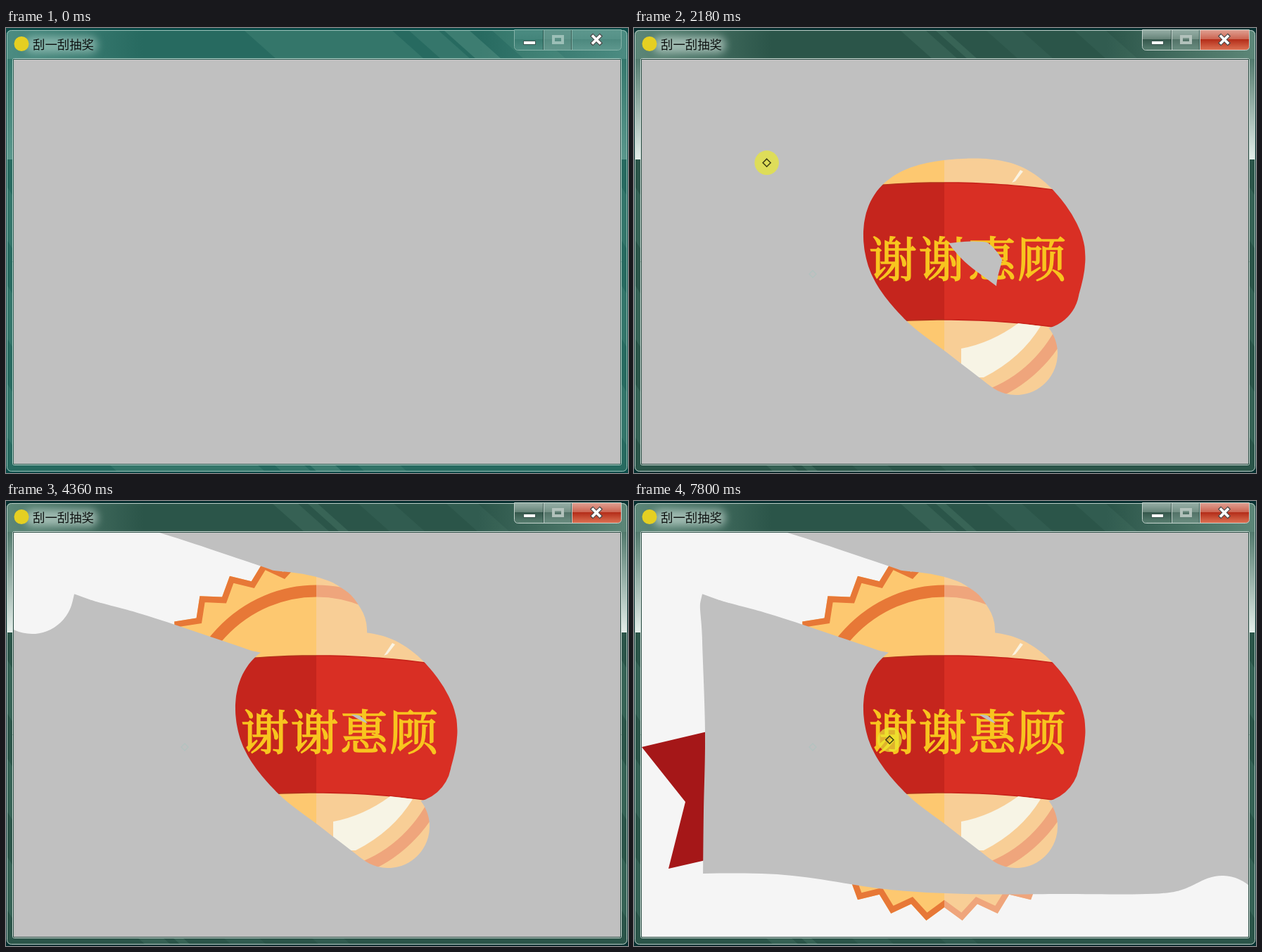
Animation, 884 px wide and 633 px high, one loop 8000 ms. Source, as an HTML page with a canvas:

```html
<!DOCTYPE html>
<html lang="zh">
<head>
<meta charset="utf-8">
<title>刮一刮抽奖</title>
<style>
html, body { margin: 0; width: 100%; height: 100%; overflow: hidden; background: #0a4a48; }
canvas { display: block; }
</style>
</head>
<body>
<canvas id="stage" width="884" height="633"></canvas>
<script>
const W = 884, H = 633, LOOP = 8000, STEP = 312, LEAD = 20, LAST = 25;
const BRUSH = 59, DOWN = 3;
const FONT = '"Noto Sans CJK SC", "Noto Sans CJK", sans-serif';
const SERIF = '"Noto Serif CJK SC", "Noto Sans CJK SC", "Noto Sans CJK", serif';
const ctx = document.getElementById('stage').getContext('2d');

// Brush path: splines through key points spread evenly from one step to another.
const path = [
  { from: 1, to: 3, keys: [[672, 607], [543, 463]] },
  { from: 3, to: 7, keys: [[543, 463], [482, 416], [425, 371], [389, 320], [392, 268], [445, 247], [528, 252], [580, 312], [574, 370]] },
  { from: 7, to: 10, keys: [[574, 370], [540, 372], [500, 374], [450, 348], [412, 312], [454, 184], [365, 156]] },
  { from: 10, to: 19, keys: [[365, 156], [225, 109], [150, 88], [68, 68], [37, 130], [38, 200], [42, 330], [40, 440], [39, 540], [39, 590]] },
  { from: 19, to: 25, keys: [[39, 590], [200, 590], [352, 611], [470, 618], [600, 618], [765, 616], [836, 592]] }
];

function spline(a, b, c, d, t) {
  const m = (c - a) / 2, n = (d - b) / 2;
  return b + t * (m + t * (3 * (c - b) - 2 * m - n + t * (2 * (b - c) + m + n)));
}

function brushAt(step) {
  const { from, to, keys } = path.find(s => step <= s.to);
  const end = keys.length - 1;
  const u = (step - from) / (to - from) * end;
  const i = Math.min(end - 1, Math.floor(u));
  const key = k => keys[Math.max(0, Math.min(end, k))];
  return [0, 1].map(n => spline(key(i - 1)[n], key(i)[n], key(i + 1)[n], key(i + 2)[n], u - i));
}

function layer() {
  const c = document.createElement('canvas');
  c.width = W;
  c.height = H;
  return c.getContext('2d');
}

function poly(g, pts, fill) {
  g.beginPath();
  for (let i = 0; i < pts.length; i += 2) g.lineTo(pts[i], pts[i + 1]);
  g.closePath();
  if (fill) {
    g.fillStyle = fill;
    g.fill();
  }
}

function rect(g, x, y, w, h, fill) {
  g.fillStyle = fill;
  g.fillRect(x, y, w, h);
}

function disc(g, x, y, r, fill) {
  g.fillStyle = fill;
  g.beginPath();
  g.arc(x, y, r, 0, 2 * Math.PI);
  g.fill();
}

function fade(g, x0, y0, x1, y1, ...stops) {
  const s = g.createLinearGradient(x0, y0, x1, y1);
  for (const [at, color] of stops) s.addColorStop(at, color);
  return s;
}

function outline(g, x, y, w, h, r, color, width = 1) {
  g.strokeStyle = color;
  g.lineWidth = width;
  g.beginPath();
  g.roundRect(x, y, w, h, r);
  g.stroke();
}

// One half of the medal with its ribbon
function medalHalf(g, x, body, edge, band, rim) {
  g.save();
  g.beginPath();
  g.rect(x, 0, 441, H);
  g.clip();

  g.save();
  const star = [];
  for (let k = 0; k < 64; k++) {
    const a = k * Math.PI / 32, r = k % 2 ? 261 : 241;
    star.push(441 + r * Math.sin(a), 337 - r * Math.cos(a));
  }
  poly(g, star, body);
  g.clip();
  g.strokeStyle = edge;
  g.lineWidth = 17;
  g.stroke();
  g.beginPath();
  g.ellipse(441, 331, 191, 203, 0, 0, 2 * Math.PI);
  g.stroke();
  g.restore();

  const sag = dx => dx * dx * .00042;
  const curve = y => {
    for (let dx = -220; dx <= 220; dx += 10) g.lineTo(441 + dx, y + sag(dx));
  };
  g.beginPath();
  curve(220);
  g.lineTo(661, 415 + sag(220));
  for (let dx = 220; dx >= -220; dx -= 10) g.lineTo(441 + dx, 415 + sag(dx));
  g.fillStyle = band;
  g.fill();
  g.strokeStyle = rim;
  g.lineWidth = 1.6;
  g.stroke();
  g.restore();
}

function drawCard() {
  const g = layer();
  rect(g, 0, 0, W, H, '#f5f5f5');
  poly(g, [11, 350, 180, 310, 180, 493, 49, 523, 73, 428], '#a51718');
  medalHalf(g, 0, '#fdc870', '#e77837', '#c5251d', '#b3301a');
  medalHalf(g, 441, '#f8ce96', '#efa57c', '#d92f24', '#c7231a');

  g.fillStyle = '#f7f4e5';
  g.beginPath();
  g.moveTo(465, 456);
  g.quadraticCurveTo(508, 448, 546, 420);
  g.lineTo(578, 424);
  g.quadraticCurveTo(550, 470, 497, 497);
  g.lineTo(465, 497);
  g.fill();
  poly(g, [537, 220, 549, 202, 553, 204, 542, 218], '#faf3e2');

  g.font = '500 68px ' + SERIF;
  g.textAlign = 'center';
  g.fillStyle = g.strokeStyle = '#f8c51f';
  g.lineWidth = 1.5;
  [...'谢谢惠顾'].forEach((ch, i) => {
    g.fillText(ch, 368 + i * 70.5, 354);
    g.strokeText(ch, 368 + i * 70.5, 354);
  });
  return g.canvas;
}

function streak(g, x, w, alpha) {
  const color = `rgba(150,200,180,${alpha})`;
  poly(g, [x, 3, x + w, 3, x + w + 46, 44, x + 46, 44], color);
  poly(g, [x - 190, 622, x + w - 190, 622, x + w - 180, 631, x - 180, 631], color);
}

const idleLook = {
  back: '#0a4a48', glass: '#276a60', glint: '#4c8c82', side: ['#35786d', '#5a978c'],
  rim: '#9ac4ba', frame: '#b6d5cd', inner: '#28594f', line: '#85b3a9', glow: 'rgba(195,225,215,.5)',
  button: ['#4b8b81', '#44857b', '#3a7c71', '#4c8b80'],
  close: ['#5d978d', '#559187', '#4c887e', '#5d978d'], box: '#9cbfb7'
};
const focusLook = {
  back: '#062f30', glass: '#2b5549', glint: '#5d8778', side: ['#527a6d', '#e4eeea'],
  rim: '#bdd0c9', frame: '#d5e2dd', inner: '#24473e', line: '#c3d2cc', glow: 'rgba(215,232,225,.6)',
  button: ['#96aea6', '#678479', '#35574c', '#587e70'],
  close: ['#e0a092', '#cc6552', '#b32c18', '#dc7052'], box: '#b2c1bb'
};

function drawFrame(look, streaks) {
  const g = layer();
  rect(g, 0, 0, W, H, look.back);
  g.save();
  g.beginPath();
  g.roundRect(1, 3, 882, 628, 6);
  g.clip();
  rect(g, 0, 0, W, H, look.glass);
  rect(g, 0, 3, W, 41, fade(g, 0, 0, W, 0,
    [0, look.glint], [.22, look.glass], [.76, look.glass], [1, look.glint]));
  for (const s of streaks) streak(g, ...s);

  // Bright upper part of both side borders
  for (const x of [1, 874]) {
    rect(g, x, 44, 9, 143, fade(g, 0, 44, 0, 187, [0, look.side[0]], [1, look.side[1]]));
    for (let y = 225; y < 560; y += 140)
      poly(g, [x, y, x + 9, y + 14, x + 9, y + 90, x, y + 76], 'rgba(130,190,170,.13)');
  }

  g.filter = 'blur(6px)';
  g.fillStyle = look.glow;
  g.beginPath();
  g.roundRect(28, 12, 102, 24, 10);
  g.fill();
  g.restore();

  outline(g, 1.5, 3.5, 881, 627, 6, look.rim);
  outline(g, 9.5, 43.5, 865, 578, 2, look.frame);
  outline(g, 10.5, 44.5, 863, 576, 0, look.inner);
  rect(g, 11, 45, 862, 575, '#c0c0c0');

  disc(g, 22, 22.5, 10.5, '#e5cf22');
  g.font = '17.4px ' + FONT;
  g.fillStyle = '#0b0f0e';
  g.fillText('刮一刮抽奖', 38, 30);
  drawButtons(g, look);
  return g.canvas;
}

function drawButtons(g, look) {
  const gloss = ([a, b, c, d]) => fade(g, 0, 3, 0, 31, [0, a], [.45, b], [.47, c], [1, d]);
  g.save();
  g.beginPath();
  g.roundRect(723, 3, 152, 28, [0, 0, 5, 5]);
  g.clip();
  rect(g, 723, 3, 82, 28, gloss(look.button));
  rect(g, 765, 3, 39, 28, 'rgba(150,175,165,.3)');
  rect(g, 805, 3, 70, 28, gloss(look.close));
  g.restore();

  outline(g, 722.5, 2.5, 152, 29, [0, 0, 5, 5], look.line);
  for (const x of [764, 804]) {
    rect(g, x, 3, 1, 28, look.line);
    rect(g, x - 1, 3, 1, 28, 'rgba(20,50,42,.55)');
  }
  rect(g, 735, 18, 18, 6, '#3c5650');
  rect(g, 736, 19, 16, 4, '#fff');
  outline(g, 778, 12, 13, 9, 0, look.box, 4);

  for (const [color, width, d] of [['#4c4b4b', 6, 7], ['#fff', 3.7, 6]]) {
    g.strokeStyle = color;
    g.lineWidth = width;
    g.beginPath();
    for (const s of [-d, d]) {
      g.moveTo(839 - s, 16.5 - d);
      g.lineTo(839 + s, 16.5 + d);
    }
    g.stroke();
  }
}

function diamond(x, y, r, color, width) {
  poly(ctx, [x, y - r, x + r, y, x, y + r, x - r, y]);
  ctx.strokeStyle = color;
  ctx.lineWidth = width;
  ctx.stroke();
}

function drawCursor([bx, by]) {
  const x = bx * 2 / 3 - 194, y = by * 2 / 3 - 55;
  disc(ctx, x, y, 17.3, 'rgba(235,233,50,.72)');
  diamond(x, y, 5.5, '#3d3d12', 1.5);
}

const idle = drawFrame(idleLook, [[338, 210, .12], [572, 42, .13], [622, 36, .2], [690, 60, .1]]);
const focused = drawFrame(focusLook, [[378, 36, .1], [428, 14, .12], [500, 50, .06], [625, 45, .06]]);
const card = drawCard();
const scratch = layer();
scratch.lineCap = scratch.lineJoin = 'round';
scratch.lineWidth = 2 * BRUSH;

function drawScratch(step) {
  const g = scratch;
  g.globalCompositeOperation = 'source-over';
  g.clearRect(0, 0, W, H);
  g.beginPath();
  g.moveTo(...brushAt(DOWN));
  for (let k = DOWN * 16; k <= step * 16; k++) g.lineTo(...brushAt(k / 16));
  g.stroke();
  g.globalCompositeOperation = 'source-in';
  g.drawImage(card, 0, 0);
  ctx.drawImage(g.canvas, 11, 45, 862, 575, 11, 45, 862, 575);
}

function render(step) {
  ctx.drawImage(step ? focused : idle, 0, 0);
  if (!step) return;
  if (step >= DOWN) drawScratch(step);
  diamond(254, 350, 5, '#b2c2bf', 1.3);
  drawCursor(brushAt(step));
}

let shown = -1;
function tick(now) {
  const step = Math.min(LAST, Math.floor((now % LOOP + LEAD) / STEP));
  if (step !== shown) render(shown = step);
  requestAnimationFrame(tick);
}
render(0);
requestAnimationFrame(tick);
</script>
</body>
</html>
```
